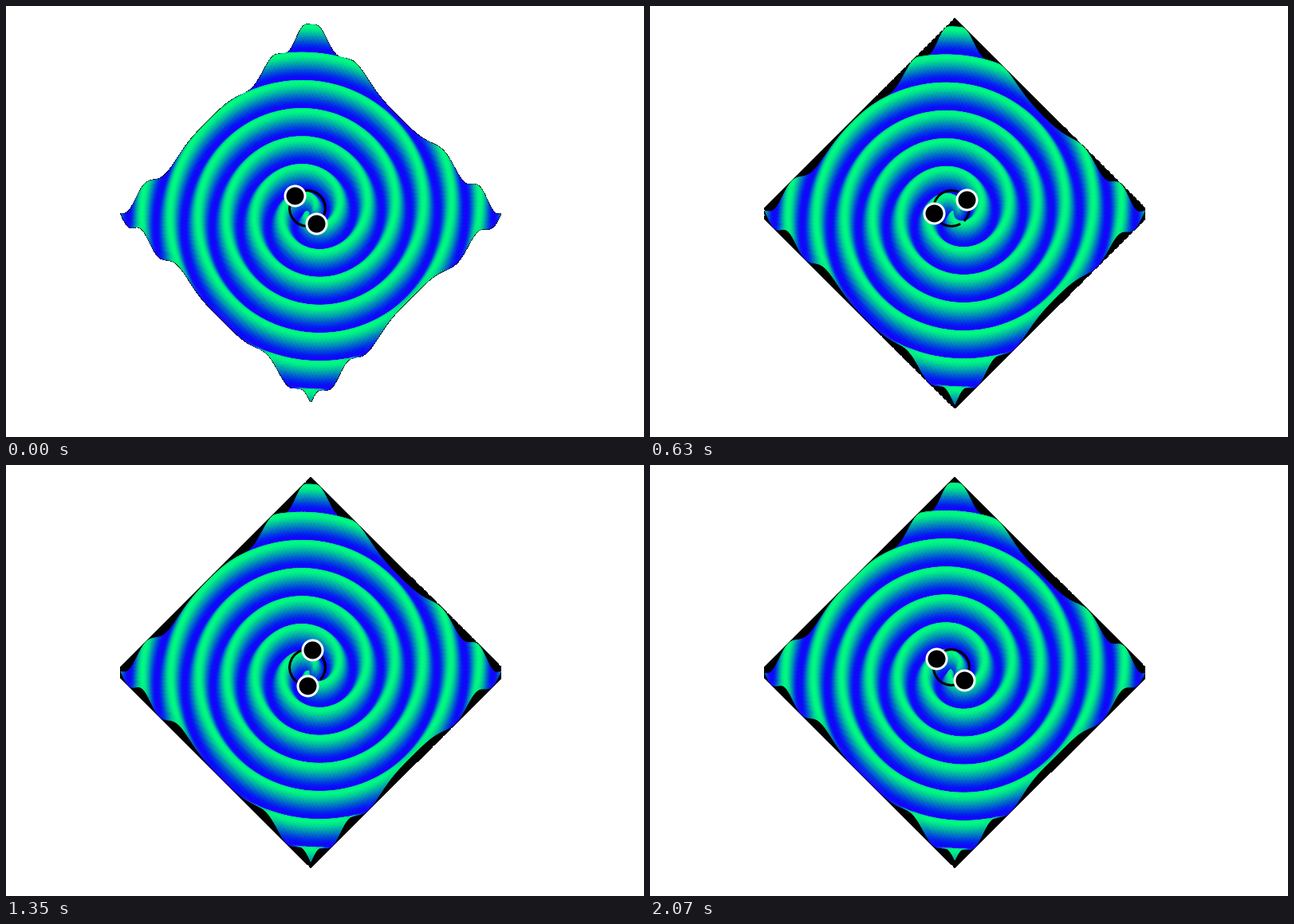
Write a matplotlib script that moves like this. It is 800 px wide and 541 px high and loops after 2.16 s.

```python
import numpy as np
import matplotlib.pyplot as plt
from matplotlib.animation import FuncAnimation
from matplotlib.colors import LinearSegmentedColormap

W, H, DPI = 800, 541, 100
FRAMES, INTERVAL = 24, 90
PX = 72 / DPI              # points per pixel

CX, CY = 382.2, 261.3      # middle of the surface
SCALE = 5.63               # pixels per unit
TILT = 0.997               # sine of the view elevation
LIFT = 6.9                 # pixels per unit of height
SPEED, PHASE = 0.8255, 0.1
ORBIT_X, ORBIT_Y, ORBIT_R = 378, 254, 22.5

# Blue to green, with a violet tint in the deepest troughs.
WINTER = LinearSegmentedColormap.from_list("troughs", [
    (0, (0.12, 0, 1)), (0.08, (0, 0.07, 0.97)), (1, (0, 1, 0.5))])

# Rows and columns run from back to front, so nearer cells paint over farther ones.
side = np.arange(-30, 30, 0.6)
side[-1] = 29.8
U, V = np.meshgrid(side, side, indexing="ij")
GX, GY = (V - U) / np.sqrt(2), (U + V) / np.sqrt(2)
RADIUS, ANGLE = np.hypot(GX, GY), np.arctan2(-GY, GX)
SX = CX + SCALE * GX


def surface(i):
    """Screen rows and heights of the two-armed spiral wave at step i."""
    z = np.cos(RADIUS - 2 * ANGLE - SPEED * i + PHASE)
    return CY + SCALE * TILT * GY - LIFT * z, z


def rim(a):
    return np.concatenate([a[0], a[1:, -1], a[-1, -2::-1], a[-2:0:-1, 0]])


def orbit(deg):
    t = np.radians(deg)
    return ORBIT_X + ORBIT_R * np.cos(t), ORBIT_Y - ORBIT_R * np.sin(t)


fig = plt.figure(figsize=(W / DPI, H / DPI), dpi=DPI, facecolor="white")
ax = fig.add_axes([0, 0, 1, 1])
ax.set_xlim(0, W)
ax.set_ylim(H, 0)
ax.axis("off")

rim_x = rim(SX)
shadows = [
    ax.fill(rim_x, rim(surface(i)[0]), fc="black", ec="black",
            lw=PX, antialiased=False, zorder=1)[0]
    for i in range(FRAMES)
]
ax.plot(*orbit(np.linspace(-45, 300, 24)), color="black", lw=3 * PX,
        solid_capstyle="butt", zorder=3)
balls, = ax.plot([], [], "o", ms=25 * PX, mfc="black", mec="white",
                 mew=3 * PX, zorder=4)
wave = []


def update(i):
    # Areas swept by earlier steps stay black.
    for k, shadow in enumerate(shadows):
        shadow.set_visible(k <= i)
    while wave:
        wave.pop().remove()
    y, z = surface(i)
    wave.append(ax.pcolormesh(SX, y, z, cmap=WINTER, vmin=-1, vmax=1,
                              shading="gouraud", zorder=2))
    balls.set_data(*orbit(np.array([135, -60]) - 15 * i))
    return [*shadows, *wave, balls]


anim = FuncAnimation(fig, update, frames=FRAMES, interval=INTERVAL,
                     init_func=lambda: update(0), repeat=True, repeat_delay=0,
                     blit=False)
plt.show()
```
